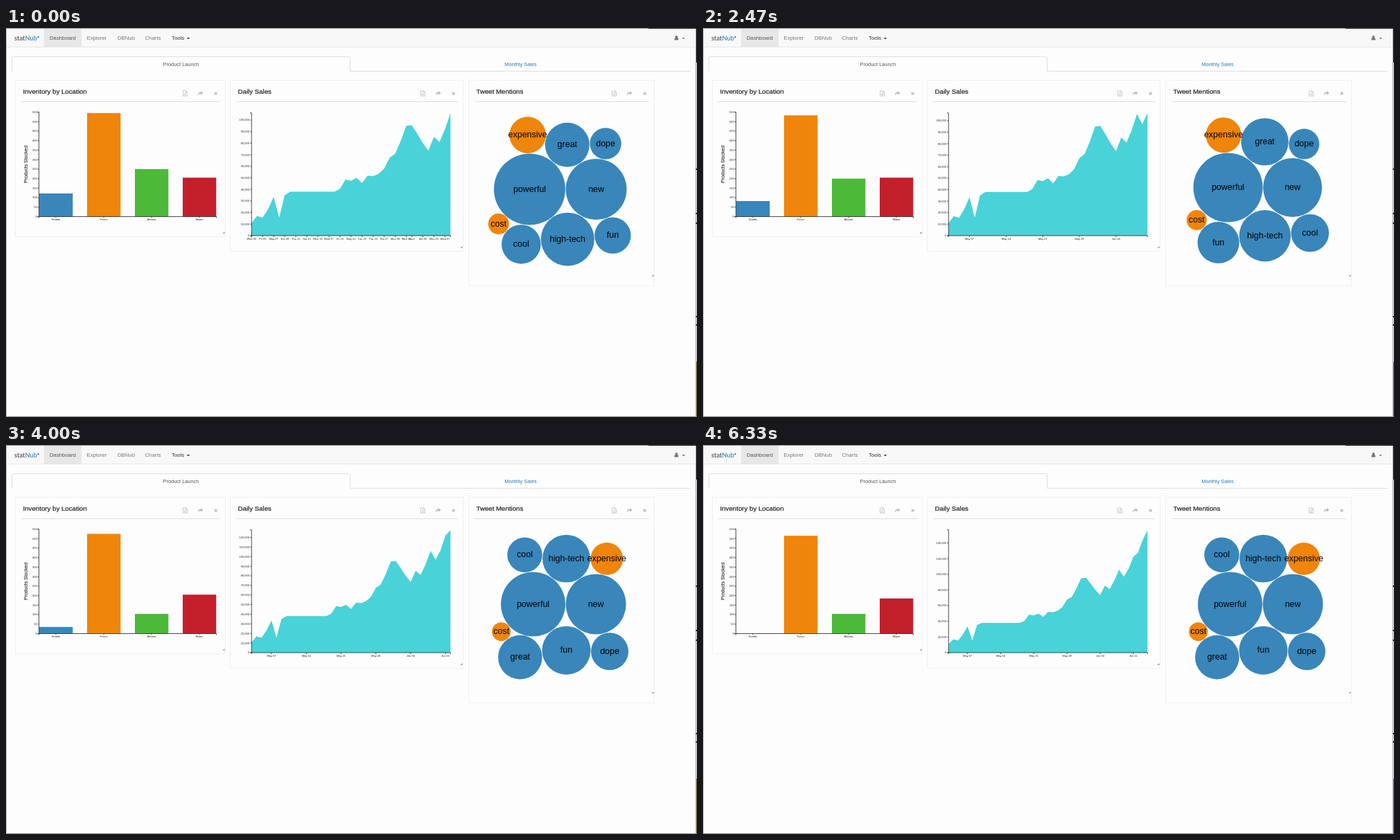
An HTML page that plays this animation: 997x562 px, repeating every 6390 ms.

```html
<!DOCTYPE html>
<html lang="en">
<head>
<meta charset="utf-8">
<title>Dashboard</title>
<style>
  html, body { margin: 0; height: 100%; overflow: hidden; background: #fdfdfd; }
  svg { display: block; width: 100%; height: 100%; font-family: "Liberation Sans", Arial, sans-serif; }
  .nav { font-size: 7.75px; fill: #777; }
  .tab { font-size: 7.4px; fill: #555; }
  .title { font-size: 9.7px; fill: #222; stroke: #222; stroke-width: .2; }
  .tick { font-size: 4px; fill: #222; }
  .axis { fill: none; stroke: #222; stroke-width: .8; }
  .word { font-size: 12.5px; text-anchor: middle; }
  .mid { text-anchor: middle; }
  .end { text-anchor: end; }
</style>
</head>
<body>
<svg id="stage" viewBox="0 0 997 562" preserveAspectRatio="none">
  <g id="page"></g>
  <g id="charts"></g>
</svg>
<script>
const LOOP = 6390, FIRST = 680, STEP = 1000;
const BLUE = '#3986bb', ORANGE = '#ef850a';

const rect = (x, y, w, h, fill, more = '') =>
  `<rect x="${x}" y="${y}" width="${w}" height="${h}" fill="${fill}" ${more}/>`;
const text = (x, y, s, cls, more = '') => `<text x="${x}" y="${y}" class="${cls}" ${more}>${s}</text>`;
const path = (d, more) => `<path d="${d}" ${more}/>`;
const circle = (x, y, r, fill) => `<circle cx="${x}" cy="${y}" r="${r}" fill="${fill}"/>`;

// ---- static page ----
function icons(x) {
  return `<g transform="translate(${x} 94.5)" fill="none" stroke="#bdbdbd">` +
    path('M-3-3.7H1L3-1.7V3.7H-3ZM1-3.7V-1.7H3M-1.5 0H1.5M-1.5 2H1.5', 'stroke-width=".8"') +
    path('M18.5 2.8C18.2-.5 20-1.8 22.7-1.8V-3.6L26-.6 22.7 2.2V.4C20.5.4 19.3 1 18.5 2.8Z', 'fill="#bdbdbd" stroke="none"') +
    path('M42.3-1.8L46 1.9M46-1.8L42.3 1.9', 'stroke-width="1.5"') + '</g>';
}

function panel(x, right, bottom, grip, title) {
  return rect(x + .5, 75.5, right - x - 1, bottom - 75, '#fdfdfd', 'stroke="#f0f0f0"') +
    text(x + 11.5, 95, title, 'title') +
    path(`M${x + 9} 106.5H${right - 8}`, 'stroke="#dedede"') + icons(right - 58.5) +
    path(`M${right - 4.5} ${grip + 2}l3-3v3z`, 'fill="#999"');
}

function drawPage() {
  const caret = (x, fill) => path(`M${x} 14h4.4l-2.2 2.3z`, `fill="${fill}"`);
  const items = [[63, 'Dashboard', '#555'], [116.5, 'Explorer', '#777'], [161, 'DBNub', '#777'],
    [200.5, 'Charts', '#777'], [239, 'Tools', '#333']];
  return rect(0, 0, 997, 562, '#fdfdfd') + rect(0, 0, 995, 27, '#f8f8f8') +
    rect(0, 27, 995, 1, '#e7e7e7') + rect(55, 1, 54, 26, '#e7e7e7') +
    text(12, 17.5, 'stat<tspan fill="#3b8ac0">Nub</tspan>', 'nav',
      'style="font:600 9.3px Lato,sans-serif;fill:#555"') + circle(46.5, 13, 1.3, '#3b8ac0') +
    items.map(([x, s, c]) => text(x, 17, s, 'nav', `style="fill:${c}"`)).join('') +
    caret(260.8, '#333') + caret(975.4, '#777') +
    circle(967.3, 12.8, 1.9, '#777') + path('M964.3 17.5c0-3 1-3.4 3-3.4s3 .4 3 3.4z', 'fill="#777"') +
    path('M8.5 63V43.5q0-2 2-2H494.5q2 0 2 2V62.5H988', 'fill="none" stroke="#dedede"') +
    text(252.5, 55, 'Product Launch', 'tab mid') +
    text(742.5, 55, 'Monthly Sales', 'tab mid', 'style="fill:#2a7ab8"') +
    panel(13, 317, 301, 295, 'Inventory by Location') +
    panel(323, 660, 322, 316, 'Daily Sales') +
    panel(667, 936, 372, 357, 'Tweet Mentions') +
    // window edges
    rect(0, 0, 997, 1, '#8a8a8a') + rect(0, 0, 1, 562, '#b5b5b5') + rect(0, 561, 997, 1, '#8a8a8a') +
    rect(995, 0, 1, 562, '#999') + rect(996, 0, 1, 562, '#e4e4e4') +
    rect(927, 0, 70, 1, '#111') + rect(996, 0, 1, 50, '#111') + rect(996, 482, 1, 80, '#8a6a3a') +
    [203, 267, 281, 416, 428].map(y => rect(995, y, 2, 2, '#333')).join('');
}

// ---- bar chart ----
const BARS = [['Seattle', BLUE], ['Frisco', ORANGE], ['Atlanta', '#4cb938'], ['Miami', '#c3202b']];
const STOCK = [
  [122, 545, 250, 205], [82, 537, 250, 205], [82, 533, 200, 205], [65, 533, 130, 205],
  [35, 525, 104, 205], [0, 525, 104, 205], [0, 515, 104, 185]];

function drawBars(stock) {
  const y = v => 272.5 - v * .2745;
  let out = '', axis = 'M45.3 121.5H47.5V272.5H45.3M47.5 274.5V272.5H303.5V274.5';
  BARS.forEach(([city, fill], i) => {
    const x = 48 + 69 * i;
    out += rect(x, y(stock[i]), 48.3, 272.5 - y(stock[i]), fill) + text(x + 24, 278.3, city, 'tick mid');
    axis += `M${x + 24} 272.5v1.8`;
  });
  for (let v = 0; v <= 550; v += 50) {
    out += text(44.8, y(v) + 1.4, v, 'tick end');
    axis += `M45.5 ${y(v)}h2`;
  }
  return out + path(axis, 'class="axis"') +
    text(0, 0, 'Products Stocked', 'mid', 'font-size="6.9" transform="translate(30.5 197) rotate(-90)"');
}

// ---- area chart: thousands per day from 3 May ----
const SALES = [11, 17, 15.5, 23, 33.5, 15.5, 35, ...Array(9).fill(38), 40.5, 48.5, 47.5, 50, 45.5, 52,
  51.5, 53.5, 58, 67.5, 71, 82, 95, 95.5, 88, 80, 73.5, 85.5, 81, 92, 106, 97, 106.6, 122, 127.6, 144, 156.3];
const WEEK = ['Sun', 'Mon', 'Tue', 'Wed', 'Thu', 'Fri', 'Sat'];

function dayLabel(date, weekday, june) {
  if (date === 1) return 'June';
  return (weekday ? WEEK[weekday] : june ? 'Jun' : 'May') + ' ' + String(date).padStart(2, '0');
}

function drawSales(count) {
  const data = SALES.slice(0, count), max = Math.max(...data);
  const x = i => 354.3 + i * 287 / (count - 1), y = v => 300 - v * 177 / max;
  let labels = '', axis = 'M352 122.7H354.3V300H352M354.3 302V300H641.3V302';
  const unit = max > 133 ? 20 : 10;
  for (let v = 0; v <= max; v += unit) {
    labels += text(351, y(v) + 1.4, v ? v + ',000' : 0, 'tick end');
    axis += `M352.3 ${y(v)}h2`;
  }
  for (let i = 0; i < count; i++) {
    const june = i > 28, date = june ? i - 28 : i + 3, weekday = (i + 3) % 7;
    if (count > 38 ? weekday : date % 2 === 0) continue;
    labels += text(x(i), 305.6, dayLabel(date, weekday, june), 'tick mid');
    axis += `M${x(i)} 300v2`;
  }
  return path(`M354.3 300L${data.map((v, i) => x(i) + ' ' + y(v)).join('L')}L641.3 300Z`, 'fill="#49d2d8"') +
    path(axis, 'class="axis"') + labels;
}

// ---- packed bubbles ----
const WORDS = [
  'powerful new high-tech great expensive dope cool fun cost',
  'powerful new high-tech great expensive dope fun cool cost',
  'powerful new fun high-tech cool expensive great dope cost'].map(s => s.split(' '));
// word order, centre of the first bubble, then radii
const PACKS = [
  [0, 755.5, 233, 51.5, 44, 38.5, 32, 26.3, 22.7, 28.3, 26.2, 15],
  [1, 757, 229.5, 50.4, 43, 37.4, 31.4, 25.8, 22.2, 30.4, 27.4, 14.6],
  [1, 757.5, 230.5, 50, 42.5, 37.2, 34.2, 25.5, 22, 30.1, 27.3, 14.5],
  [1, 762.5, 227, 48, 45.4, 35.8, 33, 24.5, 21, 33, 26.4, 14],
  [2, 760.5, 230, 46.5, 43.5, 35, 34.4, 25.2, 23.4, 31.8, 27, 13.5]];
const GAP = .6;

// Circle of radius r touching a and b, on the right-hand side of a to b.
function touch(a, b, r) {
  const dx = b.x - a.x, dy = b.y - a.y, d = Math.hypot(dx, dy);
  const da = a.r + r + GAP, db = b.r + r + GAP;
  const k = (da * da - db * db + d * d) / (2 * d), h = Math.sqrt(da * da - k * k);
  return { x: a.x + (k * dx - h * dy) / d, y: a.y + (k * dy + h * dx) / d, r };
}

function drawBubbles([order, x, y, ...r]) {
  const c = [{ x, y, r: r[0] }, { x: x + r[0] + r[1] + GAP, y, r: r[1] }];
  [[0, 1], [1, 0], [3, 0], [1, 3], [0, 2], [2, 1], [0, 6]]
    .forEach(([a, b]) => c.push(touch(c[a], c[b], r[c.length])));
  return c.map((b, i) => {
    const word = WORDS[order][i], fill = /^(expensive|cost)$/.test(word) ? ORANGE : BLUE;
    return circle(b.x, b.y, b.r, fill) + text(b.x, b.y + 3.7, word, 'word');
  }).join('');
}

// ---- playback ----
const byId = id => document.getElementById(id);
byId('page').innerHTML = drawPage();
const start = performance.now();
let shown = -1;

function tick() {
  const t = (performance.now() - start) % LOOP;
  const state = t < FIRST ? 0 : Math.floor((t - FIRST) / STEP) + 1;
  if (state !== shown) {
    shown = state;
    byId('charts').innerHTML = drawBars(STOCK[state]) + drawSales(37 + state) +
      drawBubbles(PACKS[Math.min(state, 4)]);
  }
  requestAnimationFrame(tick);
}
tick();
</script>
</body>
</html>
```
